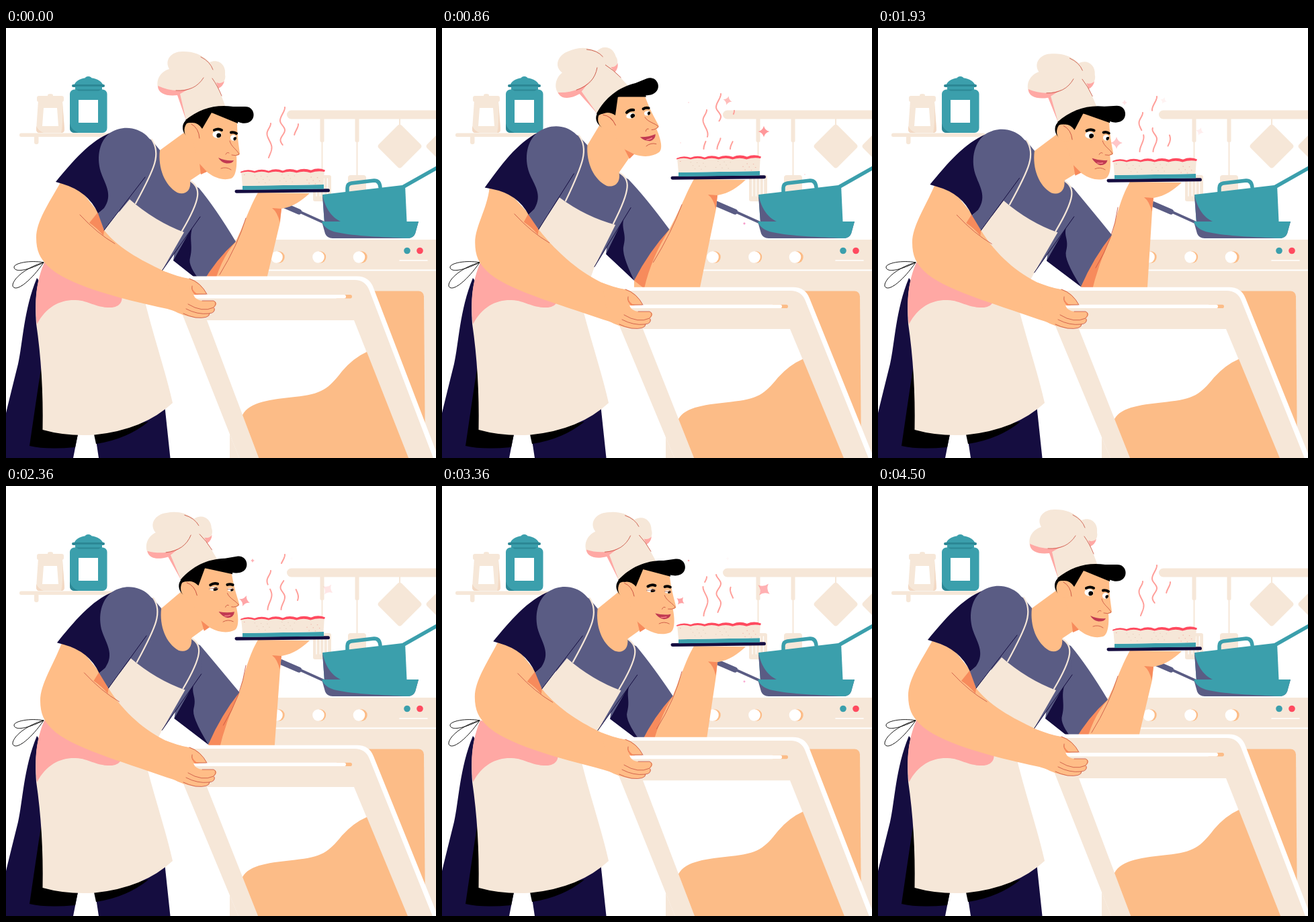
Write an HTML page with a canvas that moves like this. It is 640 by 640 pixels and loops after 4.57 s.

```html
<!DOCTYPE html>
<html lang="en">
<head>
<meta charset="utf-8">
<title>Cook with a fresh cake</title>
<style>
html, body { margin: 0; width: 100%; height: 100%; overflow: hidden; background: #fff; }
canvas { display: block; width: 100vmin; height: 100vmin; }
</style>
</head>
<body>
<canvas id="stage" width="640" height="640"></canvas>
<script>
const ctx = document.getElementById('stage').getContext('2d');
const LOOP = 4570, STEP = 1000 / 14;
const C = {
  cream: '#f6e7d8', peach: '#fcbc87', skin: '#ffbd87', shade: '#f78b5c', pink: '#ffa8a4',
  teal: '#3b9fac', deep: '#2c8795', navy: '#150d40', blue: '#5a5c84', red: '#ff4a5f',
  ink: '#c8503f', white: '#fff', black: '#000'
};

// Pose keys, one value per time
const TIMES = [0, 500, 1430, 1930, 2860, 3860, 4500];
const KEYS = {
  headX: [300, 262, 276.5, 300.5, 285.7, 307],
  headY: [150, 125.5, 135.7, 151.5, 141.3, 156.2],
  headR: [0, -21, -17, -2.5, -17.5, 4],
  skewX: [0, .05, .033, -.012, .005, -.025],
  moveX: [0, -7.5, -5, 2.5, .5, 2.5],
  skewY: [0, -.11, -.075, -.02, -.03, .012],
  moveY: [0, -2.5, -1.5, 2, 1, 1.5],
  plate: [0, -24, -12, -16, -16, 2.5],
  cuffX: [342, 339, 338, 348, 346, 342],
  cuffY: [318, 298, 305, 308, 306, 319],
  hemX: [292, 288, 284, 302, 299, 294],
  hemY: [380, 374, 381, 385, 384, 380],
  elbowR: [385, 384, 384, 401, 397, 388],
  elbowL: [0, 4, 4.5, 6, 6, 1],
  eyes: [1, 1, .35, 1, 0, 1],
  mouth: [0, 2, 2.5, 2.5, 3.5, 0]
};

// x, y, colour, then sizes, strengths and turns at the key times
const STARS = [
  [479, 154, '#ff8d90', [0, 11, 3, 6, 11, 11], [0, .9, .9, .15, .4, .9], [0, 0, 0, 20, 45, 25]],
  [425, 108, '#ff9a96', [0, 7, 6, 5, 0, 5], [0, .4, .9, .12, 0, .12], [0, 0, 45, 20, 0, 0]],
  [355, 171, '#ff8d90', [0, 1.4, 0, 9, 7.5, 6], [0, .6, .2, .5, 1, .5], [0, 0, 0, 0, 45, 20]],
  [367, 111, '#ff7f86', [0, 1.4, 0, 4, 1.6, 1.5], [0, .8, 0, .2, 1, 1], [0, 0, 0, 0, 0, 0]],
  [450, 291, '#f58ac0', [0, 2.4, 1.4, 0, 1.3, 2.4], [0, .9, .9, .2, .6, .9], [0, 0, 0, 0, 0, 0]],
  [540, 218, '#ff8d90', [0, .8, 1.3, 0, 1.2, 0], [0, .4, .8, 0, .6, 0], [0, 0, 0, 0, 0, 0]]
];

// Steam wisps: turning points, then span of the gap as it leaves the top
const WISPS = [
  { pts: [[394, 142], [388.5, 157], [395.5, 178], [389.5, 200]], gap: 7 },
  { pts: [[415, 118], [408, 138], [415, 152], [408.5, 167], [415, 181], [409.5, 200]], gap: 26 },
  { pts: [[435, 143], [429, 161], [435, 181], [429, 200]], gap: 41 }
];

const ease = u => { u = Math.min(1, Math.max(0, u)); return u * u * (3 - 2 * u); };

// Monotone cubic through the keys of a closed loop
function at(keys, t) {
  const n = keys.length, v = i => keys[(i + n) % n];
  const last = TIMES.length - 1;
  const span = i => { const j = (i + last) % last; return TIMES[j + 1] - TIMES[j]; };
  const val = i => v(((i % last) + last) % last);
  const rate = i => (val(i + 1) - val(i)) / span(i);
  const slope = i => {
    const a = rate(i - 1), b = rate(i);
    return a * b > 0 ? 2 * a * b / (a + b) : 0;
  };
  if (t >= TIMES[last]) return keys[0];
  let i = 0;
  while (t >= TIMES[i + 1]) i++;
  const h = span(i), u = (t - TIMES[i]) / h, w = 1 - u;
  return val(i) * w * w * (1 + 2 * u) + val(i + 1) * u * u * (3 - 2 * u)
    + h * u * w * (slope(i) * w - slope(i + 1) * u);
}

const fill = (color, d) => { ctx.fillStyle = color; ctx.fill(new Path2D(d)); };
function line(color, width, d) {
  ctx.strokeStyle = color;
  ctx.lineWidth = width;
  ctx.lineCap = ctx.lineJoin = 'round';
  ctx.stroke(new Path2D(d));
}
function box(color, x, y, w, h, r = 0) {
  ctx.fillStyle = color;
  ctx.beginPath();
  ctx.roundRect(x, y, w, h, r);
  ctx.fill();
}
function oval(color, x, y, rx, ry = rx) {
  ctx.fillStyle = color;
  ctx.beginPath();
  ctx.ellipse(x, y, rx, ry, 0, 0, 7);
  ctx.fill();
}
function group(draw) { ctx.save(); draw(); ctx.restore(); }
function spin(angle, x, y, draw) {
  group(() => {
    ctx.translate(x, y);
    ctx.rotate(angle);
    ctx.translate(-x, -y);
    draw();
  });
}

function shelf() {
  box(C.cream, 20, 156.5, 140, 5.5, 2.5);
  box(C.cream, 42, 160, 6.5, 13, 3);
  oval(C.cream, 66, 100, 4, 2);
  box(C.cream, 46, 101, 40, 9, 3);
  fill(C.cream, 'M48 108H84L87 151Q87 156 82 156H50Q45 156 45 151Z');
  fill('#f3d9c4', 'M45 146Q48 153 56 156H50Q45 156 45 151ZM84 112L87 151Q87 156 82 156Q85 145 84 112Z');
  fill(C.white, 'M56 119H76L78 146H54Z');

  oval(C.teal, 122.5, 75, 5, 3);
  fill(C.teal, 'M101 86C105 70 140 70 145 86Z');
  box(C.deep, 98, 84, 49, 4, 2);
  box(C.teal, 103, 87, 40, 5);
  box(C.teal, 95, 91.5, 55.5, 64.5, 7);
  fill(C.deep, 'M95 142Q97 152 108 156H102Q95 156 95 149ZM104 91.5H142L138 93.5H108Z');
  box(C.white, 108, 107, 29, 34);
}

function rack() {
  box(C.cream, 418, 122.5, 240, 13, 6.5);
  for (const x of [470.5, 522.5]) {
    box(C.cream, x - 3, 132, 6, 38, 2.5);
    line(C.cream, 2, `M${x} 168V222`);
  }
  box(C.cream, 457, 219, 27, 39, 3);
  for (let x = 462; x < 482; x += 5.5) line(C.white, 1.4, `M${x} 224V250`);
  box(C.cream, 509, 219, 27, 34, 4);
  line(C.cream, 2, 'M586 135V146');
  for (const x of [586, 658]) {
    fill(C.cream, `M${x - 31} 173L${x - 3} 145Q${x} 142 ${x + 3} 145L${x + 31} 173Q${x + 34} 176 ${x + 31} 179L${x + 3} 207Q${x} 210 ${x - 3} 207L${x - 31} 179Q${x - 34} 176 ${x - 31} 173`);
  }
}

function stove() {
  box(C.cream, 333, 315, 307, 325);
  line(C.white, 2, 'M333 360.5H640');
  box(C.peach, 500, 391.5, 122, 260, 8);
  fill(C.peach, 'M600 400H622L624 640H600Z');
  for (const [x, s] of [[403, 3], [465, 2.5], [525.5, 3.5]]) {
    oval(C.peach, x + s, 341, 8.7);
    oval(C.white, x, 341, 8.8);
  }
  oval(C.teal, 597, 331.5, 4.8);
  oval(C.red, 616, 331.5, 4.8);
  line(C.white, 1.6, 'M586 346H627');

  line(C.teal, 5.5, 'M508 244V238Q508 232 514 231L548 227Q556 227 557 237');
  line(C.teal, 5.5, 'M592 236L645 206');
  fill(C.teal, 'M471 248L594 233.5L596.5 288Q596 292 590 292H474Z');
  fill(C.blue, 'M471 248C475 268 485 284 503 290H474Z');
  line(C.blue, 4, 'M436 273L476 291');
  line(C.blue, 8, 'M400 258L436 273.5');
  fill(C.blue, 'M470 288H614L609 306Q606 313 598 313H486Q478 313 475 306Z');
  fill(C.teal, 'M470 288H614L609 306Q606 313 598 313C560 311 520 310 492 304Q474 300 470 288Z');
}

function legs() {
  line(C.black, .9, 'M56 349C36 345 12 350 12 356C13 365 34 360 56 349C30 356 9 374 10 384C14 394 36 378 56 349');
  fill(C.navy, 'M46 372C26 420 25 470 18 500Q8 540 0 573V640H100L107 604L140 500Z');
  fill(C.black, 'M53 500Q44 560 35 622Q60 628 103 624L108 600L60 570Z');
  fill(C.navy, 'M132 600L138 640H244.500L236 560Z');
  fill(C.black, 'M130 600L134 619Q180 612 212 586Z');
}

function skirt() {
  fill(C.cream, 'M57 349C45 378 43 405 45 440Q56 515 54.500 598Q90 608 132 605.500Q205 598 248 558C240 520 220 460 207 408L180 370Z');
  fill(C.pink, 'M57 349C45 378 42 405 46 441C60 414 82 404 104 405C125 406 133 417 158 416C172 414 175 404 171 394L120 360Z');
}

function door(d) {
  const top = 374, foot = 700, s = (foot - top - d) / (foot - top);
  ctx.translate(0, foot * (1 - s));
  ctx.scale(1, s);
  fill(C.white, 'M262 369.500H522Q541 369.500 547 387L668 703H372L262 425Z');
  fill(C.cream, 'M262 375H519Q535 375 541 391L660 703H372L262 425Z');
  fill(C.white, 'M299 435H518L624 703H400Z');
  fill(C.peach, 'M352 576C362 556 395 553 430 549C470 545 480 537 500 511Q517 491 537 482L624 703H400Z');
  box(C.peach, 490, 397, 25, 5.5, 2.7);
  box(C.white, 278, 397, 228, 5.5, 2.7);
}

function hat() {
  fill(C.cream, 'M226 88C223 75 232 64 243 61C235 47 247 34 264 35C279 35 291 39 303 51C316 45 328 55 326 69C328 78 322 84 315 86L327 118L268 138L257 98C240 102 228 98 226 88Z');
  fill(C.pink, 'M226 86C245 95 265 95 279 87L259 98L268 137L255 100C240 102 226 98 226 86ZM313 81Q320 84 325 79Q323 87 316 90Z');
  line(C.ink, .8, 'M253 93Q281 95 294 74M307 75Q315 86 321 101M290 43Q304 50 308 62');
}

function hair() {
  fill(C.black, 'M267 138L310 120L346 132L345 142L306 126L292 150Q284 138 272 142Q264 148 268 160C262 154 261 144 267 138Z');
  fill(C.black, 'M267 137C288 120 312 113 338 117H356C371 117 373 137 360 141C345 145 340 132 306 126L270 141Z');
}

function face() {
  fill(C.skin, 'M269 142L300 122L344 139Q344 158 346 172L348 187Q347 190 343 190C344 203 343 221 335 224C324 227 312 224 300 215L288 202Z');
}

function features(p) {
  fill(C.skin, 'M269 142C263 150 265 160 272 165C280 168 288 166 289 157C288 146 277 138 269 142Z');
  line(C.ink, .9, 'M276 143Q287 149 288 164');

  for (const [x, y, rx, ry, r] of [[314, 158.5, 6.6, 5.2, 3.5], [338.5, 163.5, 4.6, 4.4, 2.9]]) {
    if (p.eyes > .1) group(() => {
      ctx.beginPath();
      ctx.ellipse(x, y, rx, ry * p.eyes, .15, 0, 7);
      ctx.clip();
      oval(C.white, x, y, 9, 8);
      oval(C.black, x + 2.8, y + 1.6, r);
    });
    if (p.eyes < .6) line('#a35f4a', .8, `M${x - rx} ${y - 2 * p.eyes}Q${x} ${y + 2.5 - 7 * p.eyes} ${x + rx} ${y + 1.5 - 2 * p.eyes}`);
  }
  line(C.black, 4, 'M310 152Q316 149 321 152M335 155.500Q339 154.500 343 157');
  line(C.ink, .8, 'M333 168C335 177 344 181 347 188Q342 191 336 189M327 188Q329 184 332 186M320 209Q328 206 335 211');
  const m = p.mouth;
  fill('#c13a52', `M316 193Q328 ${198.5 - m * .3} 339 197Q337 ${202 + m} 328 ${201.5 + m}Q320 ${200 + m * .5} 316 193Z`);
  if (m > 1) line('#ff8a8f', 1.2, `M324 ${199 + m * .6}Q328 ${200 + m * .6} 332 ${199.5 + m * .5}`);
}

function cake() {
  line(C.navy, 5, 'M343 243.300L479.500 241.700');
  fill(C.teal, 'M352 235L473 233V239.500L352 241Z');
  fill(C.cream, 'M350 213L474 211L472.500 233L352 235Z');
  for (let i = 0; i < 24; i++) {
    const x = 354 + i * 37.3 % 115, y = 218 + i * 7.7 % 14;
    box(i % 3 ? '#e6d0be' : '#f0b5a8', x, y, 1.5, 1);
  }
  let d = 'M349 214';
  for (let i = 0; i < 6; i++) {
    const x = 349 + i * 21;
    d += `Q${x + 10} ${209 - i * .4} ${x + 21} ${213 - i * .3}`;
  }
  d += 'L474 214';
  for (let x = 474; x > 352; x -= 20.8) d += `Q${x - 10} 212 ${x - 20.8} 215.500`;
  fill(C.red, d + 'Z');
}

function wisp({ pts, gap }, t) {
  const y0 = pts[0][1], y1 = pts[pts.length - 1][1], period = y1 - y0;
  const xAt = y => {
    let i = 0;
    while (i < pts.length - 2 && y > pts[i + 1][1]) i++;
    const [a, b] = [pts[i], pts[i + 1]];
    return a[0] + (b[0] - a[0]) * ease((y - a[1]) / (b[1] - a[1]));
  };
  const start = y0 - period * t / 4500;
  for (const from of [start, start + period]) {
    const a = Math.max(y0, from), b = Math.min(y1, from + period - gap);
    if (b - a < .5) continue;
    let d = `M${xAt(a)} ${a}`;
    for (let y = a + 1; y < b; y++) d += `L${xAt(y)} ${y}`;
    line('#ff9f9a', 2, d + `L${xAt(b)} ${b}`);
  }
}

function star([x, y, color, sizes, glow, turns], t) {
  const r = Math.max(0, at(sizes, t)), k = r * .2;
  ctx.globalAlpha = Math.max(0, Math.min(1, at(glow, t)));
  ctx.translate(x, y);
  ctx.rotate(at(turns, t) * Math.PI / 180);
  let d = `M0 ${-r}`;
  for (const [a, b] of [[1, 0], [0, 1], [-1, 0], [0, -1]]) {
    const mx = (a + b) * k, my = (b - a) * k;
    d += `Q${mx} ${my} ${a * r} ${b * r}`;
  }
  fill(color, d + 'Z');
}

function draw(t) {
  const p = {};
  for (const name in KEYS) p[name] = at(KEYS[name], t);
  const d = 16 * ease(t / 500) * (1 - ease((t - 2930) / 640));
  const turn = p.headR * Math.PI / 180, cos = Math.cos(turn), sin = Math.sin(turn);

  // Points carried by the torso, head, plate, elbow and door
  const T = (x, y) => [x + p.skewX * (y - 300) + p.moveX, y + p.skewY * (x - 180) + p.moveY];
  const H = (x, y) => [p.headX + (x - 300) * cos - (y - 150) * sin, p.headY + (x - 300) * sin + (y - 150) * cos];
  const P = (x, y) => [x, y + p.plate];
  const E = (x, y) => [x + p.elbowL, y + d * .45];
  const D = (x, y) => [x, y + d];
  const cuff = [p.cuffX, p.cuffY], hem = [p.hemX, p.hemY];
  const K = (x, y) => [cuff[0] + x, cuff[1] + y];
  const mid = (dx, dy) => [(cuff[0] + hem[0]) / 2 + dx, (cuff[1] + hem[1]) / 2 + dy];
  const fold = T(146, 301);
  fold[0] += d * .3;
  fold[1] -= d * .15;

  ctx.fillStyle = C.white;
  ctx.fillRect(0, 0, 640, 640);
  shelf();
  rack();
  stove();
  legs();

  // Arm under the plate
  fill(C.skin, `M${P(375, 245)}C${P(364, 264)} ${P(358, 283)} ${cuff}L${mid(-16, -10)}L${hem}L${hem[0]} 420L${p.elbowR - 8} 420L${p.elbowR} 386L${P(408, 289)}L${P(410, 269)}C${P(428, 266)} ${P(440, 257)} ${P(452, 246)}Z`);
  fill(C.shade, `M${P(396, 268)}L${P(410, 269)}L${P(407.5, 289)}Q${P(404, 274)} ${P(396, 268)}Z`);
  fill(C.shade, `M${cuff}L${mid(-16, -10)}L${hem}L${hem[0] + 15} ${hem[1] + 12}Q${hem[0] + 26} ${hem[1] - 35} ${cuff}Z`);
  line(C.ink, .8, `M${P(357, 283)}Q${K(3, 5)} ${K(-24, 49)}`);
  fill(C.blue, `M${T(270, 232)}L${T(287, 238)}Q${T(312, 268)} ${cuff}Q${mid(-4, -5)} ${hem}L${T(249, 346)}L${T(255, 300)}Z`);
  fill(C.navy, `M${T(284, 284)}C${T(268, 308)} ${K(-62, 2)} ${K(-68, 24)}Q${K(-72, 36)} ${hem}L${T(249, 346)}Z`);

  // Shirt and apron
  skirt();
  fill(C.blue, `M${T(205, 160)}L${T(217, 167)}L${T(230, 183)}L${T(262, 240)}L${T(274, 227)}L${T(288, 240)}L${T(289, 281)}L${T(231, 363)}L${T(150, 330)}Z`);
  fill(C.cream, `M${T(184, 255)}Q${T(222, 288)} ${T(265, 304)}L${T(231, 363)}L207 412L120 372L${fold}Z`);
  line(C.navy, 1, `M${T(289, 281)}L${T(231, 363)}`);

  fill(C.skin, `M${T(229, 182)}L${H(270, 152)}L${H(300, 190)}L${H(298, 211)}L${T(274, 227)}C${T(276, 243)} ${T(266, 249)} ${T(255, 245)}C${T(236, 234)} ${T(226, 208)} ${T(229, 182)}Z`);
  fill(C.shade, `M${H(288, 201)}L${H(301, 213)}L${H(290, 218)}Z`);

  const strap = `M${T(217, 166)}C${T(231, 187)} ${T(222, 208)} ${T(193, 261)}M${T(275, 228)}C${T(290, 238)} ${T(291, 253)} ${T(262, 302)}`;
  const seam = `${T(155, 156)}C${T(140, 167)} ${T(134, 190)} ${T(141, 214)}C${T(147, 232)} ${T(160, 248)} ${T(146, 268)}L${T(137, 276)}`;

  group(() => {
    ctx.translate(p.headX, p.headY);
    ctx.rotate(turn);
    ctx.translate(-300, -150);
    const lean = turn * .1;
    spin(lean, 295, 130, hat);
    face();
    spin(lean, 295, 130, hair);
    features(p);
  });
  group(() => door(d));

  // Arm resting on the door
  fill(C.skin, `M${T(81, 230)}C${E(63, 262)} ${E(45, 288)} ${E(45, 312)}C${E(45, 332)} ${E(51, 343)} ${E(62, 354)}C${E(90, 382)} ${E(165, 402)} ${D(240, 418)}L${D(266, 426)}L${D(280, 390)}L${D(276, 374)}Q${D(256, 371)} ${D(240, 364)}C${D(208, 349)} ${E(170, 331)} ${fold}L${T(137, 274)}L${T(110, 240)}Z`);
  group(() => {
    ctx.translate(0, d);
    fill(C.skin, 'M238 363Q262 372 274 373Q290 378 299 396L279 397Q282 405 292 406H308C315 407 315 413 309 416C314 419 308 425 303 424C305 431 291 432 280 431Q262 428 248 420Z');
    line(C.ink, .8, 'M277 384Q275 392 283 396H298M273 373Q290 379 299 396M292 406H309Q315 409 309 416Q292 424 271 411M310 417Q312 424 302 425Q285 427 268 418M303 425Q303 433 282 431Q272 429 264 425');
    fill(C.shade, 'M277 385Q278 393 287 397L281 397Q276 392 277 385Z');
  });
  fill(C.shade, `M${T(137, 274)}L${fold}L${fold[0] - 1} ${fold[1] + 8}Q${fold[0] - 10} ${fold[1] - 3} ${fold[0] - 22} ${fold[1] - 11}Z`);
  line(C.ink, .8, `M${fold[0] - 36} ${fold[1] - 23}Q${fold[0] - 10} ${fold[1] + 5} ${fold[0] + 16} ${fold[1] + 20}`);

  // Sleeve halves and straps
  fill(C.navy, `M${T(74, 229)}C${T(98, 200)} ${T(125, 167)} ${T(158, 155)}L${T(165, 255)}L${T(137, 276)}Q${T(122, 243)} ${T(84, 232)}Z`);
  fill(C.blue, `M${seam}L${fold}L${T(207, 222)}L${T(222, 188)}C${T(222, 158)} ${T(185, 137)} ${T(155, 156)}Z`);
  line(C.navy, 1, `M${T(207, 222)}L${fold}`);
  line(C.cream, 2.2, strap);

  group(() => {
    ctx.translate(0, p.plate);
    cake();
    WISPS.forEach(w => wisp(w, Math.min(t, 4500)));
  });
  STARS.forEach(s => group(() => star(s, t)));
}

const begin = performance.now();
function tick(now) {
  const t = Math.max(0, now - begin) % LOOP;
  draw(Math.floor(t / STEP + .05) * STEP);
  requestAnimationFrame(tick);
}
draw(0);
requestAnimationFrame(tick);
</script>
</body>
</html>
```
